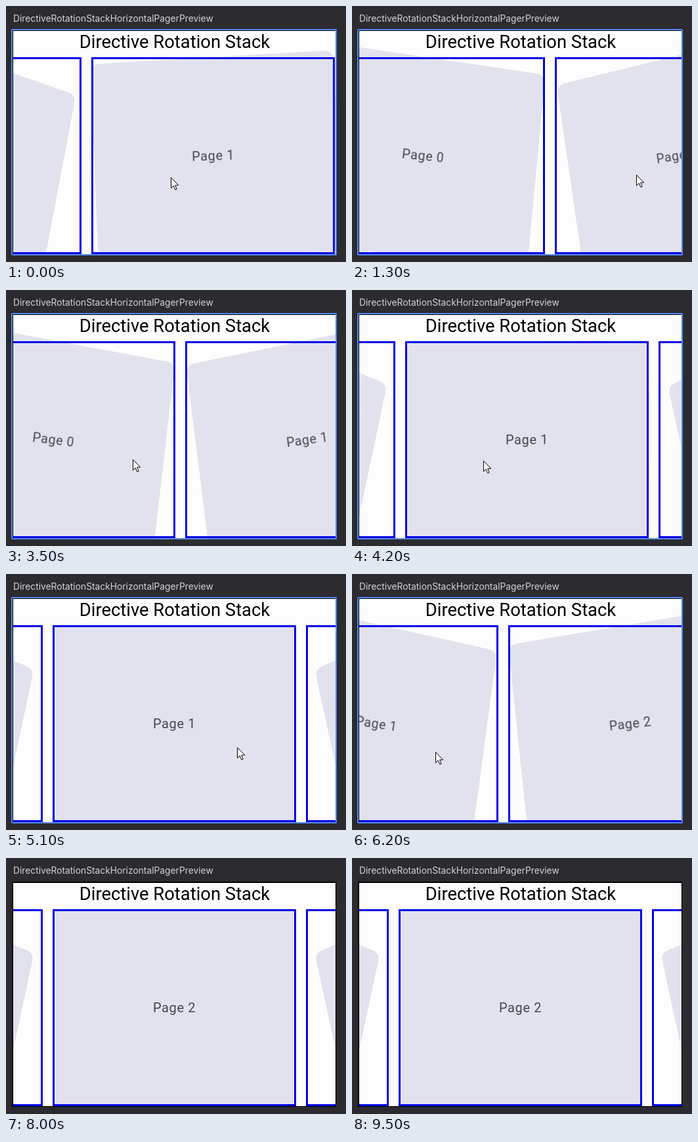
An HTML page that plays this animation: 518 px wide and 390 px high, repeating every 9.6 s.

```html
<!DOCTYPE html>
<html lang="en">
<head>
<meta charset="utf-8">
<title>Directive Rotation Stack</title>
<style>
  html, body { margin: 0; width: 100%; height: 100%; overflow: hidden; background: #2b2b30; }
  #stage { position: relative; width: 518px; height: 390px; overflow: hidden; background: #2b2b30; }
  #stage div, #stage svg { position: absolute; box-sizing: border-box; }
  #label { left: 11px; top: 9px; font: 13.8px/20px Inter, sans-serif; color: #d3d4d9; white-space: nowrap; }
  #edge { left: 9px; top: 36px; width: 494px; height: 343px; background: #000; }
  #screen { left: 11px; top: 38px; width: 491px; height: 340px; overflow: hidden; background: #fdfdfd; }
  #heading { left: 0; top: 0; width: 492px; font: 27.4px/35px Roboto, sans-serif; color: #000; text-align: center; white-space: nowrap; }
  .page { left: 60px; top: 40px; width: 371px; height: 300px; }
  .card, .frame { left: 0; top: 0; width: 100%; height: 100%; }
  .card { border-radius: 14px; background: #e2e2ee; color: #44454e; text-align: center;
    font: 20px/300px Roboto, sans-serif; letter-spacing: .625px; white-space: nowrap; }
  .frame { border: 3px solid #0000e6; }
  #focus { left: 8px; top: 35px; width: 496px; height: 345px; border: 2px solid #548af7; border-radius: 2px; }
  #cursor { left: 0; top: 0; width: 16px; height: 22px; overflow: visible; }
</style>
</head>
<body>
<div id="stage">
  <div id="label">DirectiveRotationStackHorizontalPagerPreview</div>
  <div id="edge"></div>
  <div id="screen"><div id="heading">Directive Rotation Stack</div></div>
  <div id="focus"></div>
  <svg id="cursor" viewBox="0 0 16 22">
    <path d="M.5.5V16.5L4.2 13L6.9 19L9.2 18L6.7 12H11.8Z" fill="#fff" stroke="#000" stroke-width="1"/>
  </svg>
</div>
<script>
const LOOP = 9600, STEP = 100, STRIDE = 386, HOVER_END = 7500;
const $ = id => document.getElementById(id);

function add(parent, cls, text = '') {
  const el = document.createElement('div');
  el.className = cls;
  el.textContent = text;
  return parent.appendChild(el);
}

const pages = [0, 1, 2, 3].map(i => {
  const box = add($('screen'), 'page');
  const card = add(box, 'card', 'Page ' + i);
  add(box, 'frame');
  return { box, card };
});

const line = u => u;
const settle = u => 1 - (1 - u) ** 3;
const smooth = u => u * u * (3 - 2 * u);

// Keys: time, value, easing used to arrive there
const scroll = [
  [0, .847], [1300, .383, line], [1450, .33, line], [2150, 0, settle],
  [2400, 0, line], [3500, .477, line], [3750, .6, line], [4500, 1, settle],
  [5100, 1, line], [6300, 1.58, smooth], [7116, 2, settle]
];
const mouseX = [
  [0, 251], [1300, 433, line], [1450, 453, line], [2400, 386, smooth],
  [3500, 193, line], [3750, 147, line], [5100, 352, smooth],
  [6300, 122, smooth], [6900, 120, line]
];
const mouseY = [
  [0, 261], [1300, 257, line], [2400, 257, line], [3500, 258, line],
  [5100, 264, smooth], [6900, 275, smooth]
];

function at(keys, t) {
  const n = keys.findIndex(k => k[0] > t);
  if (n < 0) return keys[keys.length - 1][1];
  const [t0, a] = keys[n - 1], [t1, b, ease] = keys[n];
  return a + (b - a) * ease((t - t0) / (t1 - t0));
}

function draw(t) {
  const pos = at(scroll, t);
  pages.forEach(({ box, card }, i) => {
    const d = i - pos;
    box.style.display = Math.abs(d) < 1.4 ? 'block' : 'none';
    box.style.transform = `translateX(${Math.round(d * STRIDE)}px)`;
    card.style.transform = Math.abs(d) < .001 ? 'none'
      : `perspective(491px) rotateY(${-22.5 * d}deg) rotateZ(${-15 * d}deg)`;
  });
  const hover = t < HOVER_END ? 'visible' : 'hidden';
  $('focus').style.visibility = $('cursor').style.visibility = hover;
  $('cursor').style.transform =
    `translate(${Math.round(at(mouseX, t))}px, ${Math.round(at(mouseY, t))}px)`;
}

const start = performance.now();
function tick() {
  const t = (performance.now() - start) % LOOP;
  draw(Math.floor(t / STEP) * STEP);
  requestAnimationFrame(tick);
}
draw(0);
requestAnimationFrame(tick);
</script>
</body>
</html>
```
